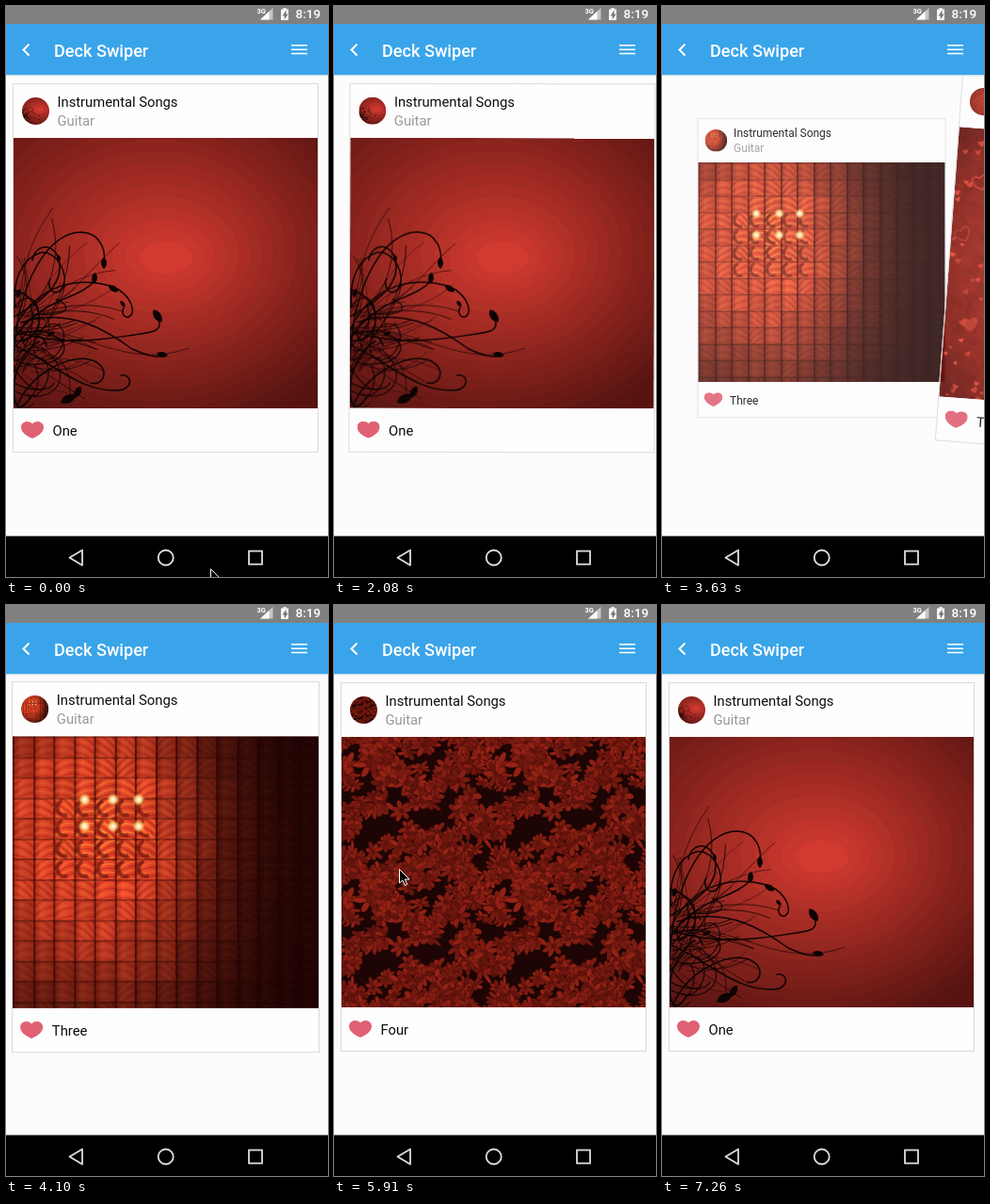
These frames come from a looping animation (342 px wide and 606 px high, 7560 ms). An HTML page with a canvas:

```html
<!DOCTYPE html>
<html lang="en">
<head>
<meta charset="utf-8">
<title>Deck Swiper</title>
<style>
  html, body { margin: 0; width: 100%; height: 100%; overflow: hidden; background: #fcfcfc; }
  #stage { position: absolute; left: 0; top: 0; width: 342px; height: 606px; overflow: hidden;
    background: #fcfcfc; font-family: Roboto, "Open Sans", sans-serif; }
  .card { position: absolute; left: 7px; top: 82px; width: 325px; height: 392px; box-sizing: border-box;
    background: #fefefe; border: 1px solid #dadada; visibility: hidden; }
  .card > * { position: absolute; }
  .card span { font-size: 14.75px; line-height: 18px; white-space: nowrap; color: #0c0c0c; }
  .avatar { left: 9px; top: 14px; width: 29px; height: 29px; border-radius: 50%; }
  .pic { left: 0; top: 57px; width: 323px; height: 287px; }
  .card .title { left: 46.5px; top: 10px; }
  .card .note { left: 46.5px; top: 29.5px; color: #999; }
  .card .name { left: 41.5px; top: 359px; }
  .heart { left: 8px; top: 358px; }
  #chrome { position: absolute; left: 0; top: 0; z-index: 20; }
</style>
</head>
<body>
<div id="stage">
  <svg id="chrome" width="342" height="606" font-family="Roboto, 'Open Sans', sans-serif">
    <rect y="73" width="342" height="1" fill="#cfe0ea"/>
    <rect y="74" width="342" height="1" fill="#f2f3f4"/>
    <rect width="342" height="19" fill="#808080"/>
    <rect y="19" width="342" height="54" fill="#3aa4ea"/>
    <g fill="#fff">
      <text x="266.500" y="7.500" font-size="7.500" font-weight="700">3G</text>
      <path d="M270 14.500L283.500 2V14.500Z" opacity=".55"/>
      <path d="M270 14.500L279.500 5.700V14.500Z"/>
      <path d="M294.500 2h3v1.500h2.500V15h-8V3.500h2.500Z" opacity=".95"/>
      <path d="M297.500 4.500l-4 6h2.200v4l4-6h-2.200Z" fill="#777"/>
      <text x="307.500" y="13.300" font-size="13.500" font-weight="500">8:19</text>
      <text x="51" y="53.500" font-size="18.100" font-weight="500">Deck Swiper</text>
    </g>
    <g fill="none" stroke="#fff">
      <path d="M24.500 40.500L18.500 46.500L24.500 52.500" stroke-width="2"/>
      <path d="M303 41.800H320M303 46.200H320M303 50.600H320" stroke-width="1.500"/>
    </g>
    <rect y="562.600" width="342" height="44"/>
    <g fill="none" stroke="#dedede" stroke-width="1.800">
      <path d="M67.500 585.500L81 577.500V593.500Z" stroke-linejoin="round"/>
      <circle cx="169.700" cy="585.500" r="8"/>
      <rect x="258" y="578.500" width="14" height="14"/>
    </g>
    <path id="cursor" d="M0 0V14.500L3.400 11.500L5.800 17L8.200 16L5.900 10.600H10.500Z" fill="#000" stroke="#fff"/>
  </svg>
</div>
<script>
const LOOP = 7560, W = 323, H = 287, TAU = Math.PI * 2;
const stage = document.getElementById('stage');
const cursor = document.getElementById('cursor');

function seeded(seed) {
  return () => {
    seed = seed + 0x6D2B79F5 | 0;
    let n = Math.imul(seed ^ seed >>> 15, 1 | seed);
    n = n + Math.imul(n ^ n >>> 7, 61 | n) ^ n;
    return ((n ^ n >>> 14) >>> 0) / 4294967296;
  };
}
const mix = (a, b, k) => a + (b - a) * k;
const tone = (a, b, k) => `rgb(${a.map((c, i) => Math.round(mix(c, b[i], k)))})`;
const bell = (d, spread) => Math.exp(-((d / spread) ** 2));

// ---- Pictures ----

function leaf(g, x, y, size, angle) {
  g.save();
  g.translate(x, y);
  g.rotate(angle);
  g.scale(size, size);
  g.fill(new Path2D('M0 -1C.7 -.5 .6 .5 0 1C-.6 .5 -.7 -.5 0 -1Z'));
  g.restore();
}

function paintSwirls(g) {
  const rnd = seeded(5);
  g.fillStyle = '#581210';
  g.fillRect(0, 0, W, H);
  for (let i = 17; i >= 0; i--) {
    g.fillStyle = tone([210, 58, 47], [88, 20, 17], Math.pow(i / 17, 0.9));
    g.beginPath();
    g.ellipse(162 - i * 1.2, 127 - i * 0.8, 28 + i * 13.5, 17 + i * 11.2, 0, 0, TAU);
    g.fill();
  }
  g.strokeStyle = g.fillStyle = '#0d0303';
  g.lineCap = 'round';
  // fine hairs fanning out of the lower left corner
  for (let i = 0; i < 38; i++) {
    const a = mix(-1.75, 0.7, rnd()), len = mix(45, 120, rnd()), bend = mix(-0.55, 0.55, rnd());
    const x = mix(-5, 25, rnd()), y = mix(185, 250, rnd());
    g.lineWidth = mix(0.35, 0.9, rnd());
    g.beginPath();
    g.moveTo(x, y);
    g.quadraticCurveTo(x + Math.cos(a + bend) * len * 0.6, y + Math.sin(a + bend) * len * 0.6,
      x + Math.cos(a) * len, y + Math.sin(a) * len);
    g.stroke();
  }
  // tangle of loops near the root
  for (let i = 0; i < 20; i++) {
    g.lineWidth = mix(0.6, 1.8, rnd());
    g.beginPath();
    g.ellipse(mix(-5, 50, rnd()), mix(175, 265, rnd()), mix(15, 40, rnd()), mix(10, 28, rnd()),
      rnd() * 3, rnd() * TAU, rnd() * TAU + 2);
    g.stroke();
  }
  g.lineWidth = 1.5;
  [
    'M0 236C4 150 38 100 72 100C92 101 99 118 96 138',
    'M0 205C25 150 75 148 106 158C124 166 132 186 122 190C117 191 114 185 117 180',
    'M3 206C55 222 100 213 128 209C152 206 158 204 154 192',
    'M8 196C62 178 104 208 126 224C140 230 150 234 158 231',
    'M0 190C40 168 55 150 47 126C40 110 22 114 20 130',
    'M2 180C-2 150 10 128 28 122C46 118 60 146 52 160C45 170 34 160 39 150',
    'M0 214C30 168 66 174 86 152M0 220C45 240 70 270 112 268C128 266 126 250 114 252',
    'M4 284C18 250 60 228 84 236C104 244 96 264 82 260'
  ].forEach(d => g.stroke(new Path2D(d)));
  g.lineWidth = 0.6;
  g.stroke(new Path2D('M20 205C70 200 120 248 186 223M4 200C8 140 16 110 42 74M10 205C60 170 90 130 112 112'));
  [[96, 133, 6, 0], [86, 149, 6, 0.1], [106, 160, 6, -1], [116, 176, 4, -0.7], [153, 189, 8, -0.6],
   [158, 230, 6, -1.4], [48, 128, 4, -0.2], [5, 165, 5, 0.3], [40, 208, 4, 1], [58, 277, 9, 1.1],
   [68, 270, 7, 0.5]].forEach(l => leaf(g, ...l));
}

const heartPath = new Path2D('M0 .9C-1.5 -.1 -.8 -1.1 0 -.4C.8 -1.1 1.5 -.1 0 .9Z');

function paintHearts(g) {
  const rnd = seeded(21);
  const glow = g.createRadialGradient(162, 135, 20, 162, 140, 215);
  glow.addColorStop(0, '#c13323');
  glow.addColorStop(0.45, '#a6291d');
  glow.addColorStop(0.8, '#801a12');
  glow.addColorStop(1, '#5f100c');
  g.fillStyle = glow;
  g.fillRect(0, 0, W, H);
  // mottled paper
  for (let i = 0; i < 700; i++) {
    g.fillStyle = rnd() < 0.5 ? 'rgba(40,0,0,.07)' : 'rgba(240,70,40,.06)';
    g.beginPath();
    g.ellipse(rnd() * W, rnd() * H, mix(2, 12, rnd()), mix(1, 6, rnd()), rnd() * 3, 0, TAU);
    g.fill();
  }
  for (let i = 0; i < 400; i++) {
    const x = rnd() * W, y = rnd() * H, big = rnd() < 0.24;
    const far = Math.hypot((x - 162) / 162, (y - 150) / 144);
    const size = big ? mix(6, 10, rnd()) : mix(2, 4.2, rnd());
    const turn = mix(-0.6, 0.6, rnd()), alpha = mix(0.5, 1, rnd());
    if (rnd() > far * 0.9) continue;
    g.save();
    g.translate(x, y);
    g.rotate(turn);
    g.scale(size, size);
    g.globalAlpha = alpha;
    g.fillStyle = g.strokeStyle = '#e64734';
    g.lineWidth = 1.1 / size;
    if (big && i % 4) g.stroke(heartPath); else g.fill(heartPath);
    g.restore();
  }
}

function paintGlass(g) {
  const rnd = seeded(8), edge = n => Math.round(n * 21.5);
  for (let r = 0; r < 14; r++) for (let c = 0; c < 16; c++) {
    const x = edge(c), y = edge(r), w = edge(c + 1) - x, h = edge(r + 1) - y;
    const mx = x + w / 2, my = y + h / 2;
    const light = Math.min(1, 1.12 * mix(0.88, 1.08, rnd()) *
      bell(mx - 100, mx < 100 ? 200 : 105) * bell(my - 105, 175));
    const hot = bell(mx - 95, 62) * bell(my - 95, 66);
    g.save();
    g.beginPath();
    g.rect(x, y, w, h);
    g.clip();
    const shade = g.createLinearGradient(x, 0, x + w, 0);
    shade.addColorStop(0, tone([22, 3, 3], [190, 44, 25], light));
    shade.addColorStop(0.4, tone([34, 5, 4], [250, 82, 48], light));
    shade.addColorStop(1, tone([24, 3, 3], [222, 60, 35], light));
    g.fillStyle = shade;
    g.fillRect(x, y, w, h);
    // wavy ribs inside each block
    const lean = mix(-9, 9, rnd());
    for (let k = -2; k < 7; k++) {
      const ly = y + k * 4.4;
      g.lineWidth = 1.4;
      g.strokeStyle = k % 2 ? `rgba(90,10,6,${0.26 * light + 0.05})`
        : `rgba(255,${Math.round(105 + 95 * hot)},60,${0.04 + 0.45 * light * (0.3 + hot)})`;
      g.beginPath();
      g.moveTo(x, ly + lean);
      g.quadraticCurveTo(mx, ly - 5, x + w, ly - lean);
      g.stroke();
    }
    if (c > 1 && c < 7 && r > 2 && r < 7) {
      g.strokeStyle = 'rgba(90,16,8,.6)';
      g.lineWidth = 4;
      g.beginPath();
      g.arc(mx + 1, my, 8, 1.2, 4.4);
      g.stroke();
    }
    g.fillStyle = 'rgba(40,3,2,.55)';
    g.fillRect(x, y, 2, h);
    g.fillStyle = 'rgba(40,3,2,.35)';
    g.fillRect(x, y, w, 2);
    g.restore();
  }
  for (const x of [76, 106, 133]) for (const y of [67, 95]) {
    const spot = g.createRadialGradient(x, y, 1, x, y, 7);
    spot.addColorStop(0, '#fffbe6');
    spot.addColorStop(0.45, 'rgba(255,220,130,.85)');
    spot.addColorStop(1, 'rgba(255,140,50,0)');
    g.fillStyle = spot;
    g.fillRect(x - 7, y - 7, 14, 14);
  }
}

function paintFlowers(g) {
  const rnd = seeded(33), tw = 161.5, th = 143.5;
  const holes = [[102, 84], [12, 8], [112, 68], [36, 100]];
  g.fillStyle = '#1c0504';
  g.fillRect(0, 0, W, H);
  for (let i = 0; i < 150; i++) {
    const x = rnd() * tw, y = rnd() * th, size = mix(11, 17, rnd()), turn = rnd() * TAU;
    const squash = mix(0.55, 1, rnd());
    const petals = Array.from({ length: 7 }, () => [mix(0.6, 1.15, rnd()), mix(0.65, 1.1, rnd()), rnd()]);
    if (holes.some(h => Math.hypot(x - h[0], y - h[1]) < 14)) continue;
    for (let ox = -1; ox < 3; ox++) for (let oy = -1; oy < 3; oy++) {
      g.save();
      g.translate(x + ox * tw, y + oy * th);
      g.rotate(turn);
      g.scale(1, squash);
      for (const [step, length, level] of petals) {
        g.rotate(step);
        g.fillStyle = tone([96, 20, 13], [150, 35, 22], level);
        g.strokeStyle = 'rgba(50,7,4,.45)';
        g.lineWidth = 0.6;
        g.beginPath();
        g.ellipse(size * 0.55 * length, 0, size * 0.45 * length, size * 0.2, 0, 0, TAU);
        g.fill();
        g.stroke();
      }
      g.fillStyle = '#5c120b';
      g.beginPath();
      g.arc(0, 0, size * 0.2, 0, TAU);
      g.fill();
      g.restore();
    }
  }
}

// ---- Cards ----

function makeCard(name, paint) {
  const card = document.createElement('div');
  card.className = 'card';
  card.innerHTML = `<canvas class="avatar" width="58" height="58"></canvas>
    <span class="title">Instrumental Songs</span><span class="note">Guitar</span>
    <canvas class="pic" width="${W}" height="${H}"></canvas>
    <svg class="heart" width="24" height="18"><path fill="#e06173" d="M12 18C8.500 16.500 0 12.500 0 6
      C0 2.500 3 0 6.500 0C9 0 11 1.200 12 2.600C13 1.200 15 0 17.500 0C21 0 24 2.500 24 6
      C24 12.500 15.500 16.500 12 18Z"/></svg>
    <span class="name">${name}</span>`;
  const pic = card.querySelector('.pic');
  paint(pic.getContext('2d'));
  card.querySelector('.avatar').getContext('2d').drawImage(pic, 0, 0, 250, H, 0, 0, 58, 58);
  stage.appendChild(card);
  return card;
}
const cards = [['One', paintSwirls], ['Two', paintHearts], ['Three', paintGlass], ['Four', paintFlowers]]
  .map(c => makeCard(...c));

// ---- Motion ----

// Steps are [time, ...values]; a repeated time makes a hard change.
function sample(steps, t) {
  let i = -1;
  while (i + 1 < steps.length && steps[i + 1][0] <= t) i++;
  if (i < 0) return steps[0].slice(1);
  const a = steps[i], b = steps[i + 1];
  if (!b) return a.slice(1);
  const k = (t - a[0]) / (b[0] - a[0]);
  return a.slice(1).map((v, n) => mix(v, b[n + 1], k));
}

// Waits small behind the top card, then springs to full size.
const grow = (peek, go) => [[peek, 0.8], [peek + 80, 0.812], [go, 0.812], [go, 0.86], [go + 80, 0.94],
  [go + 190, 0.99], [go + 300, 1.006], [go + 370, 1.006], [go + 470, 1]];

const turns = [
  { show: 0, size: [[0, 1]],
    slide: [[2080, 0], [2080, 9], [2280, 9], [2280, 90], [2330, 230], [2390, 400]] },
  { show: 2080, size: grow(2280, 2570),
    slide: [[3550, 0], [3550, 70], [3630, 297], [3740, 297], [3740, 345], [3800, 400]] },
  { show: 3550, size: grow(3550, 3740),
    slide: [[4330, 0], [4670, 4], [4900, 4], [4900, 5], [4990, 5], [4990, 110], [5130, 400]] },
  { show: 4330, size: grow(4990, 5430),
    slide: [[6260, 0], [6370, 25], [6420, 130], [6520, 400]] },
  { show: 6260, size: grow(6370, 6530), slide: [[LOOP, 0]] }
];

const pointer = [
  [[0, 217, 597], [20, 217, 597]],
  [[1370, 204, 598], [1500, 160, 500], [1680, 95, 375], [1870, 65, 317], [2080, 65, 317]],
  [[2720, 285, 312], [2880, 43, 300], [3180, 43, 300], [3250, 285, 313]],
  [[4120, 320, 300], [4280, 60, 292], [4330, 60, 292]],
  [[5640, 330, 300], [5800, 110, 284], [5900, 69, 280], [5940, 69, 280], [6110, 58, 288], [6260, 58, 288]],
  [[6800, 325, 320], [6900, 285, 450], [7000, 235, 570], [7060, 235, 570], [7200, 217, 606]]
];

function draw(t) {
  cards.forEach(c => c.style.visibility = 'hidden');
  turns.forEach((turn, i) => {
    const end = turn.slide[turn.slide.length - 1][0];
    if (t < turn.show || t >= end) return;
    const [dx] = sample(turn.slide, t), [size] = sample(turn.size, t);
    const style = cards[i % 4].style;
    style.visibility = 'visible';
    style.zIndex = 10 - i;
    style.opacity = Math.min(1, mix(1, size, 0.75)) * (1 - dx / 3000);
    style.transform = dx || size !== 1
      ? `translateX(${dx}px) rotate(${dx * 0.0145}deg) scale(${size})` : 'none';
  });
  const path = pointer.find(p => t >= p[0][0] && t < p[p.length - 1][0]);
  cursor.style.display = path ? '' : 'none';
  if (path) {
    const [x, y] = sample(path, t);
    cursor.setAttribute('transform', `translate(${Math.round(x) + 0.5} ${Math.round(y) + 0.5})`);
  }
}

const start = performance.now();
function tick() {
  draw((performance.now() - start) % LOOP);
  requestAnimationFrame(tick);
}
tick();
</script>
</body>
</html>
```
